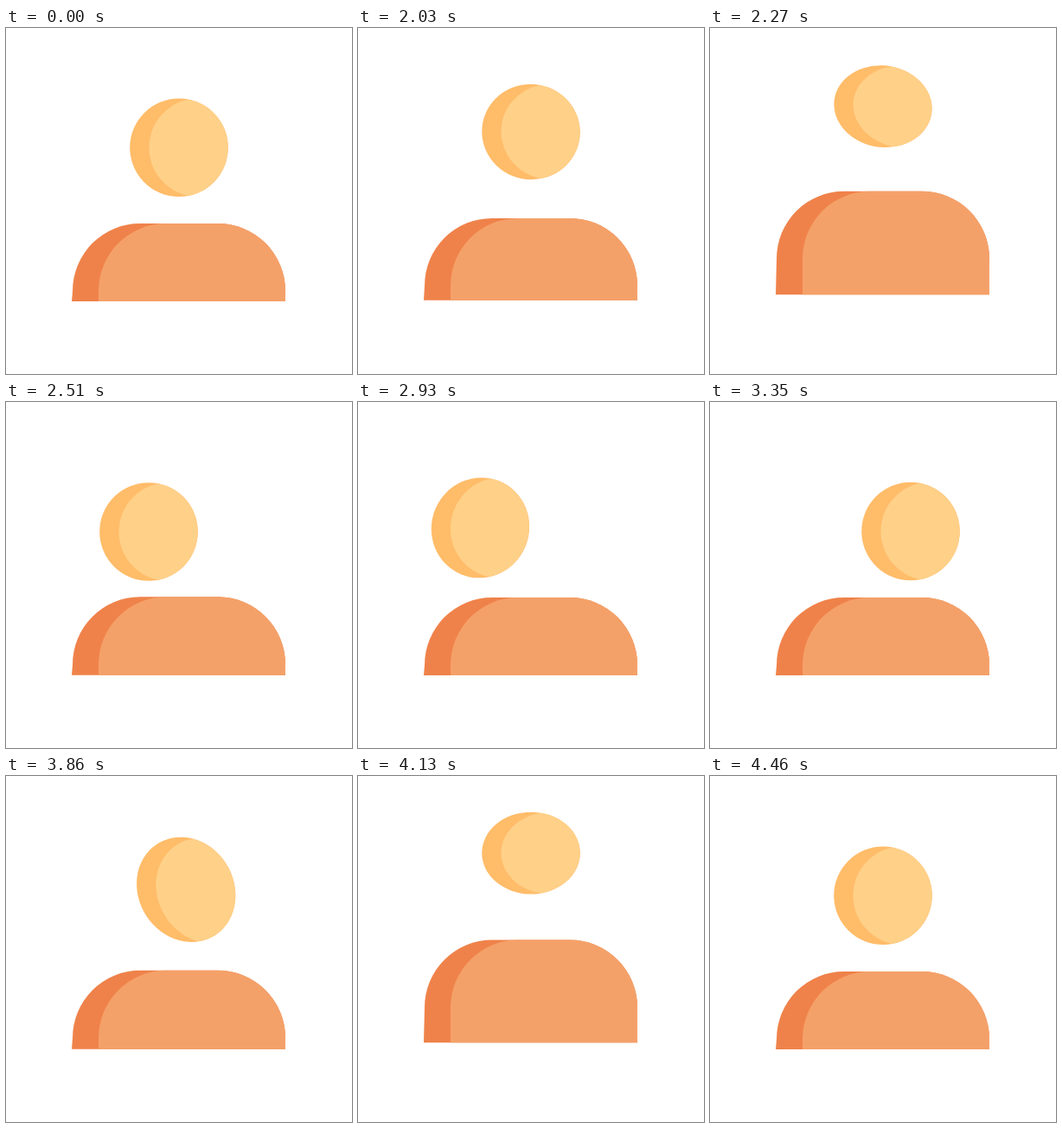
An HTML page for the animation above (4.55 s loop, 400 by 400 pixels).

```html
<!DOCTYPE html>
<html lang="en">
<head>
<meta charset="utf-8">
<title>Bouncing person</title>
<style>
  html, body { margin: 0; width: 100%; height: 100%; overflow: hidden; background: #fff; }
  svg { display: block; width: 100%; height: 100%; }
</style>
</head>
<body>
<svg viewBox="0 0 400 400">
  <path id="bodyShade" fill="#ef824a"/>
  <path id="bodyLight" fill="#f4a169"/>
  <g id="head">
    <circle r="56.8" fill="#ffbc69"/>
    <path d="M11-55.7A56.8 56.8 0 0 0 11 55.7A56.8 56.8 0 0 0 11-55.7Z" fill="#ffd088"/>
  </g>
</svg>
<script>
const LOOP = 4550, STEP = 30;
const [bodyShade, bodyLight, head] =
  ['bodyShade', 'bodyLight', 'head'].map(id => document.getElementById(id));

const linear = u => u;
const inQuad = u => u * u;
const outCubic = u => 1 - (1 - u) ** 3;
const cubic = u => u < 0.5 ? 4 * u ** 3 : 1 - 4 * (1 - u) ** 3;
const outSine = u => Math.sin(u * Math.PI / 2);
const sine = u => (1 - Math.cos(u * Math.PI)) / 2;

// Shoulders with round upper corners; the left side is the only variable one
function shoulders(foot, left, top, bottom) {
  const r = 78;
  return `M${foot} ${bottom}L${left} ${top + r}A${r} ${r} 0 0 1 ${left + r} ${top}` +
    `H245A${r} ${r} 0 0 1 323 ${top + r}V${bottom}Z`;
}

function draw(time) {
  const t = time - (time + 10) % STEP;
  const ramp = (from, to, ease) => ease(Math.min(1, Math.max(0, (t - from) / (to - from))));
  const pulse = (from, to) => Math.sin(Math.PI * ramp(from, to, linear));

  // Body follows the two big jumps
  const lift = 37.5 * (ramp(2000, 2290, outSine) - ramp(2290, 2530, sine)
    + ramp(3830, 4090, sine) - ramp(4090, 4460, sine));
  const top = 226 - lift, bottom = 316 - 0.21 * lift;
  bodyShade.setAttribute('d', shoulders(76, 77, top, bottom));
  bodyLight.setAttribute('d', shoulders(107, 107, top, bottom));

  // Head: jump to the left, hop to the right, jump back to the middle
  const hop = ramp(2900, 3200, linear), settle = ramp(3200, 3350, sine);
  const x = 200 - 59 * ramp(2270, 2720, cubic) + 105 * ramp(2900, 3200, cubic)
    - 14 * settle - 32 * ramp(3530, 4080, cubic);
  const y = 138.3 - 51.3 * ramp(2000, 2220, outCubic) + 63 * ramp(2200, 2490, inQuad)
    - 52 * hop + 59 * hop * hop - 7.5 * settle
    - 61 * ramp(3700, 4080, cubic) + 49.8 * ramp(4090, 4460, inQuad);

  const squash = 0.17 * (ramp(2000, 2270, outSine) - ramp(2270, 2480, sine)
    + ramp(3860, 4080, sine) - ramp(4090, 4460, sine));
  const stretch = 0.08 * (pulse(2270, 2490) + pulse(2900, 3200)) + 0.105 * pulse(3530, 4080);
  const angle = t < 2800 ? 125 : t < 3400 ? -80 + 125 * hop : 59;
  const tilt = t < 2800 ? 8 : 0;

  head.setAttribute('transform', `translate(${x} ${y})` +
    `rotate(${angle})scale(${1 + stretch} ${1 - stretch * 0.3})rotate(${-angle})` +
    `rotate(${tilt})scale(1 ${1 - squash})rotate(${-tilt})`);
}

const start = performance.now();
function tick() {
  draw((performance.now() - start) % LOOP);
  requestAnimationFrame(tick);
}
tick();
</script>
</body>
</html>
```
